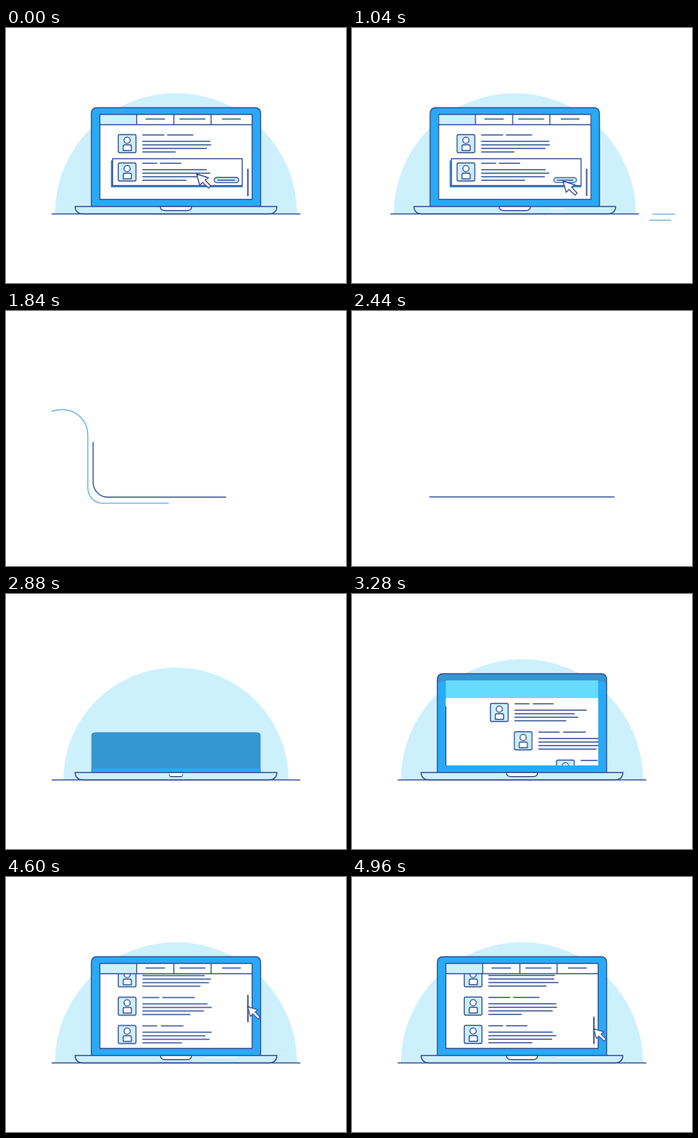
An HTML page without scripts that plays this animation: 480 px wide and 360 px high, repeating every 5 s.

```html
<!DOCTYPE html>
<html lang="en">
<head>
<meta charset="utf-8">
<title>Laptop loop</title>
<style>
html, body { margin: 0; width: 100%; height: 100%; overflow: hidden; background: #fff; }
svg { display: block; width: 100vw; height: 100vh; }
:root { --navy: #304b92; --blue: #29aaf6; --pale: #cdf0fd; --sky: #58b4dc; }

.ink { fill: none; stroke: var(--navy); stroke-width: 1.4; stroke-linecap: round; stroke-linejoin: round; }
.pale { fill: var(--pale); }
.white { fill: #fff; }
.anim, .row { animation: 5s linear infinite; }

/* Departure */
.scene { animation-name: leave; }
@keyframes leave {
  0%, 17% { transform: none; animation-timing-function: ease-in; }
  20.8% { transform: translateX(-10px); }
  22.4% { transform: translateX(-26px); }
  25% { transform: translateX(-120px); }
  30%, 44% { transform: translateX(-480px); }
  44.01%, 100% { transform: none; }
}
.trail { fill: none; stroke-width: 1.4; stroke-dasharray: 0 2000; stroke: var(--sky); }
.navy-trail { animation-name: navy-trail; }
@keyframes navy-trail {
  0%, 18% { stroke-dasharray: 0 2000; stroke-dashoffset: -40; opacity: 0; }
  18.1% { opacity: 1; }
  20.8% { stroke-dasharray: 31 2000; stroke-dashoffset: -24; stroke: #7bb2e8; }
  22.4% { stroke-dasharray: 110 2000; stroke-dashoffset: -1; stroke: var(--navy); }
  30% { stroke-dasharray: 300 2000; stroke-dashoffset: -20; }
  34.4% { stroke-dasharray: 268 2000; stroke-dashoffset: -108; }
  36.8% { stroke-dasharray: 257 2000; stroke-dashoffset: -168; opacity: 1; stroke: var(--navy); }
  44%, 100% { stroke-dasharray: 0 2000; stroke-dashoffset: -640; opacity: 0; stroke: var(--navy); }
}
.sky-trail { animation-name: sky-trail; }
@keyframes sky-trail {
  0%, 18% { stroke-dasharray: 0 2000; stroke-dashoffset: -45; opacity: 0; }
  18.1% { opacity: 1; }
  20.8% { stroke-dasharray: 30 2000; stroke-dashoffset: -30; }
  22.4% { stroke-dasharray: 90 2000; stroke-dashoffset: -1; }
  30% { stroke-dasharray: 350 2000; stroke-dashoffset: -40; }
  36.8% { stroke-dasharray: 274 2000; stroke-dashoffset: -249; opacity: 1; }
  43%, 100% { stroke-dasharray: 0 2000; stroke-dashoffset: -610; opacity: 0; }
}

/* Assembly */
.dome { transform-origin: 240px 263px; animation-name: dome; }
@keyframes dome {
  0%, 40% { transform: none; }
  40.01%, 52% { transform: scale(0); animation-timing-function: ease-out; }
  57.6% { transform: scale(.93); }
  59.5% { transform: scale(1.005); }
  61%, 100% { transform: none; }
}
.ground, .tray, .notch { transform-origin: 240px 262px; }
.ground { animation-name: ground; }
@keyframes ground {
  0%, 40% { transform: none; }
  40.01%, 44.8% { transform: scaleX(0); animation-timing-function: ease-out; }
  52%, 100% { transform: none; }
}
.tray { animation-name: tray; }
@keyframes tray {
  0%, 40% { transform: none; }
  40.01%, 51% { transform: scaleX(0); animation-timing-function: ease-out; }
  56%, 100% { transform: none; }
}
.notch { animation-name: notch; }
@keyframes notch {
  0%, 40% { transform: none; }
  40.01%, 56% { transform: scaleX(0); }
  57.6% { transform: scaleX(.45); animation-timing-function: ease-out; }
  61%, 100% { transform: none; }
}
.lid { transform-origin: 240px 252px; }
.shade { fill: #3596d0; animation-name: shade; }
@keyframes shade {
  0%, 40% { transform: none; }
  40.01%, 56% { transform: scaleY(0); }
  57.6% { transform: scaleY(.4); animation-timing-function: ease-out; }
  60.5%, 100% { transform: none; }
}
.body { fill: var(--blue); animation-name: body; }
@keyframes body {
  0%, 40% { transform: none; }
  40.01%, 57% { transform: scaleY(0); }
  57.6% { transform: scaleY(.036); animation-timing-function: ease-out; }
  65.6% { transform: scaleY(.92); }
  67.5%, 100% { transform: none; }
}
.panel { transform-origin: 240px 242px; }
.cyan { fill: #66dbff; animation-name: cyan; }
@keyframes cyan {
  0%, 40% { transform: none; }
  40.01%, 59.5% { transform: scaleY(0); animation-timing-function: ease-out; }
  64.5%, 100% { transform: none; }
}
.page { animation-name: page; }
@keyframes page {
  0%, 40% { transform: none; }
  40.01%, 60.5% { transform: scaleY(0); animation-timing-function: ease-out; }
  65.6% { transform: scaleY(.79); }
  67.6%, 100% { transform: none; }
}
.outline { stroke-dasharray: 1; animation-name: outline; }
@keyframes outline {
  0%, 40% { stroke-dashoffset: 0; opacity: 1; }
  40.01%, 65% { stroke-dashoffset: 1; opacity: 0; }
  65.1% { opacity: 1; }
  70%, 100% { stroke-dashoffset: 0; opacity: 1; }
}
.tabs { transform-origin: 132px 122px; animation-name: tabs; }
@keyframes tabs {
  0%, 40% { transform: none; }
  40.01%, 67% { transform: scaleX(0); animation-timing-function: ease-out; }
  72%, 100% { transform: none; }
}

/* Page content */
.row { animation-name: slide; animation-delay: var(--wait, 0s); }
@keyframes slide {
  0%, 40% { transform: none; }
  40.01%, 60.2% { transform: translateX(220px); animation-timing-function: cubic-bezier(.33, 1, .68, 1); }
  72.2%, 100% { transform: none; }
}
.scroll { animation-name: scroll; }
@keyframes scroll {
  0%, 40% { transform: translateY(-204px); }
  40.01%, 87% { transform: none; animation-timing-function: ease-in-out; }
  99.2%, 100% { transform: translateY(-185px); }
}
.bar { transform-origin: 341px 150px; stroke-width: 2; animation-name: bar; }
@keyframes bar {
  0%, 40% { transform: translateY(49px); opacity: 1; }
  40.01%, 76% { transform: scaleY(0); opacity: 0; }
  76.1% { opacity: 1; }
  79%, 87% { transform: none; animation-timing-function: ease-in-out; }
  99.2%, 100% { transform: translateY(47.5px); opacity: 1; }
}
.card { animation-name: card; }
@keyframes card {
  0%, 40% { opacity: 1; }
  40.01%, 100% { opacity: 0; }
}
.button { transform-origin: 311px 214.5px; animation-name: press; }
@keyframes press {
  0%, 11% { transform: none; }
  14%, 40% { transform: scale(.92); }
  41%, 100% { transform: none; }
}
.cursor { animation-name: point; }
@keyframes point {
  0% { transform: translate(269px, 206px); animation-timing-function: ease-in-out; }
  10%, 12% { transform: translate(308px, 216px); }
  14% { transform: translate(308px, 216px) scale(.9); }
  16%, 40% { transform: translate(308px, 216px); }
  40.01%, 80% { transform: translate(312px, 236px) scale(0); }
  80.5% { transform: translate(314px, 233px) scale(.88); animation-timing-function: ease-out; }
  82.5% { transform: translate(335px, 190px) scale(.88); animation-timing-function: ease-out; }
  84.4%, 87% { transform: translate(341px, 166px) scale(.88); animation-timing-function: ease-in-out; }
  99.2%, 100% { transform: translate(341px, 214px) scale(.88); }
}
.swoosh { animation-name: swoosh; }
@keyframes swoosh {
  0%, 82% { opacity: 0; }
  82.5%, 85% { opacity: 1; }
  86%, 100% { opacity: 0; }
}
.glint { fill: none; stroke: #fff; stroke-width: 1.3; animation-name: glint; }
@keyframes glint {
  0%, 17% { stroke-dasharray: 0 200; stroke-dashoffset: -10; opacity: 0; }
  20.8%, 36% { stroke-dasharray: 17 200; stroke-dashoffset: -18; opacity: 1; }
  40%, 80% { stroke-dasharray: 0 200; stroke-dashoffset: 0; opacity: 0; }
  84.8% { stroke-dasharray: 28 200; stroke-dashoffset: 0; opacity: 1; }
  99.2%, 100% { stroke-dasharray: 61 200; stroke-dashoffset: -16; opacity: 1; }
}
</style>
</head>
<body>
<svg viewBox="0 0 480 360">
  <defs>
    <clipPath id="view"><rect x="132.5" y="122" width="215" height="120"/></clipPath>
    <clipPath id="list"><rect x="132.5" y="137" width="215" height="105"/></clipPath>
    <path id="lid" d="M120.5 252V121Q120.5 112.5 129 112.5H351Q359.5 112.5 359.5 121V252"/>
    <g id="avatar" class="ink">
      <rect class="pale" x="158.5" y="-.5" width="25" height="25.5" rx="2"/>
      <circle class="white" cx="171" cy="7.5" r="4.4"/>
      <path class="white" d="M165.5 22V16Q165.5 14 167.5 14H175Q177 14 177 16V22Z"/>
    </g>
  </defs>

  <g class="anim scene">
    <path class="anim dome pale" d="M69 263A171 171 0 0 1 411 263Z"/>

    <use href="#lid" class="anim lid shade"/>
    <use href="#lid" class="anim lid body"/>
    <use href="#lid" class="anim ink outline" pathLength="1" style="stroke-dasharray:none"/>
    <rect class="anim panel cyan" x="132.5" y="122" width="215" height="120"/>
    <rect class="anim panel page white" x="132.5" y="122" width="215" height="120"/>

    <g clip-path="url(#list)">
      <g class="anim card">
        <path d="M148 187H151V222H334V225H148Z" fill="#3d8fd0"/>
        <rect class="ink white" style="fill:#fff" x="150.5" y="184.5" width="183" height="38"/>
        <g class="anim button ink">
          <rect class="pale" x="294" y="211" width="34.5" height="7.4" rx="3.7"/>
          <path d="M299 214.7H323"/>
        </g>
      </g>
      <g class="anim scroll">
        <g transform="translate(0 155)"><g class="row">
          <use href="#avatar"/>
          <path class="ink" d="M193 0H213M219 0H247M193 9H294M193 14H277M193 19H282M193 24H265"/>
        </g></g>
        <g transform="translate(0 195)"><g class="row" style="--wait:.081s">
          <use href="#avatar"/>
          <path class="ink" d="M193 0H222M228 0H259M193 9H280M193 14H289M193 19H286M193 24H274"/>
        </g></g>
        <g transform="translate(0 235)"><g class="row" style="--wait:.175s">
          <use href="#avatar"/>
          <path class="ink" d="M193 0H216M221 0H266M193 9H284M193 14H290M193 19H279M193 24H260"/>
        </g></g>
        <g transform="translate(0 275)">
          <use href="#avatar"/>
          <path class="ink" d="M193 0H213M219 0H250M193 9H290M193 14H281M193 19H287M193 24H248"/>
        </g>
        <g transform="translate(0 315)">
          <use href="#avatar"/>
          <path class="ink" d="M193 0H220M226 0H258M193 9H286M193 14H285M193 19H291M193 24H274"/>
        </g>
        <g transform="translate(0 355)">
          <use href="#avatar"/>
          <path class="ink" d="M193 0H223M228 0H264M193 9H288M193 14H289M193 19H283M193 24H239"/>
        </g>
        <g transform="translate(0 395)">
          <use href="#avatar"/>
          <path class="ink" d="M193 0H213M218 0H247M193 9H283M193 14H288M193 19H282M193 24H254"/>
        </g>
      </g>
      <path class="anim bar ink" d="M341.5 150.5V187.5"/>
    </g>

    <g clip-path="url(#view)">
      <g class="anim tabs">
        <path class="white" d="M132 122H348V137H132Z"/>
        <path class="pale" d="M132 122H184.5V137H132Z"/>
        <path class="ink" d="M132 136.5H348M184.5 122V136.5M237 122V136.5M289.5 122V136.5M197.5 128.5H224M245.5 128.5H281M305.5 128.5H331"/>
      </g>
    </g>
    <path class="anim ink outline" pathLength="1" d="M132.5 242V122H347.5V242Z"/>

    <g class="anim tray">
      <path class="ink" style="fill:var(--pale)" d="M97.5 252H382.5Q382 262.5 371 262.5H109Q98 262.5 97.5 252Z"/>
      <path class="anim glint" d="M273 255H350"/>
    </g>
    <path class="anim notch ink" style="fill:#fff" d="M218 252H262Q262 257.7 256 257.7H224Q218 257.7 218 252Z"/>
    <path class="anim ground ink" d="M65 262.5H415"/>

    <path class="anim swoosh ink" d="M331.5 208L336 199.5M334 192.5L335.5 189.5"/>
    <path class="anim cursor ink" style="fill:#fff" d="M0 0L17 5.5L12 8.5L20 17L17 20L8.5 12L4.5 16Z"/>
  </g>

  <path class="anim trail navy-trail" d="M480 262.8H144A21 21 0 0 1 123 241.8V148A35 36 0 0 0 88 112C58 112 30 140 0 150"/>
  <path class="anim trail sky-trail" d="M480 271.4H137A21.5 21.5 0 0 1 115.5 250V175A35.5 36 0 0 0 80 139.3C50 139 30 165 0 170"/>
</svg>
</body>
</html>
```
